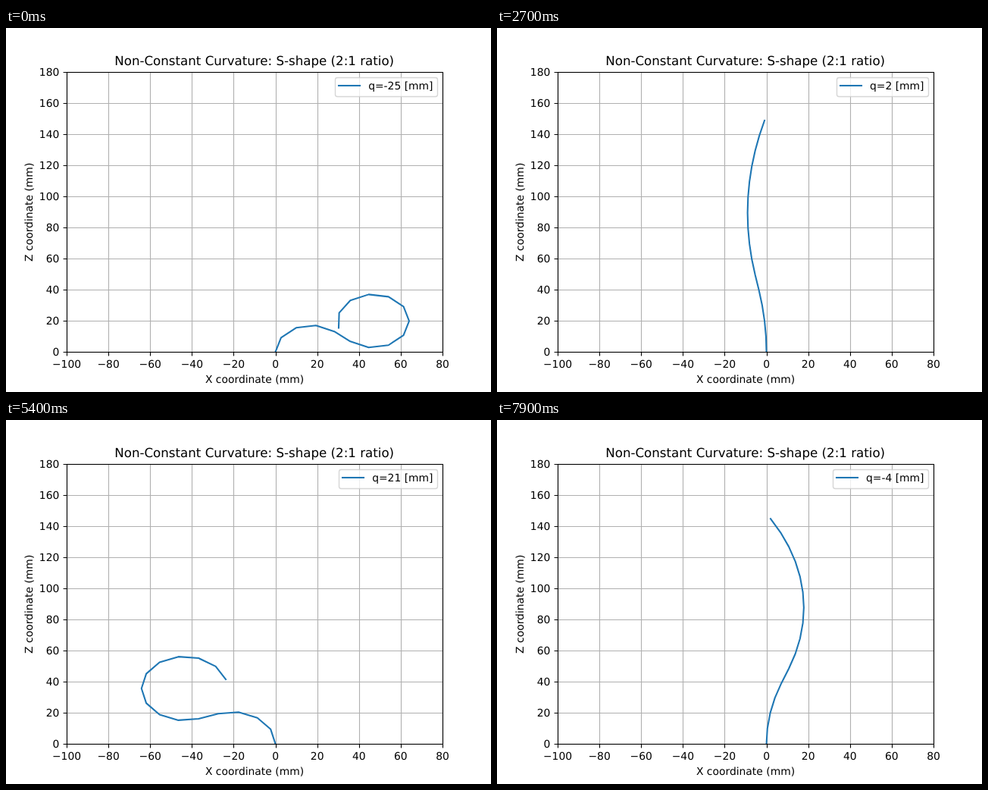
Animation of 640x480 px, one loop 8000 ms. Source, as an HTML page:

```html
<!DOCTYPE html>
<html lang="en">
<head>
<meta charset="utf-8">
<title>S-shape curvature</title>
<style>
  html, body { margin: 0; width: 100%; height: 100%; overflow: hidden; background: #fff; }
  svg { display: block; width: 640px; height: 480px; }
  text { font: 13.889px "DejaVu Sans", sans-serif; text-rendering: geometricPrecision; fill: #000; }
  .title { font-size: 16.667px; }
  .mid { text-anchor: middle; }
  .end { text-anchor: end; }
  path, rect { fill: none; }
  #grid { stroke: #b0b0b0; stroke-width: 1.111; }
  #ticks, #frame { stroke: #000; stroke-width: 1.111; }
  .curve { stroke: #1f77b4; stroke-width: 2.083; stroke-linecap: square; stroke-linejoin: round; }
  #box { fill: #fff; fill-opacity: .8; stroke: #ccc; stroke-opacity: .8; stroke-width: 1.389; }
</style>
</head>
<body>
<svg viewBox="0 0 640 480">
  <clipPath id="area"><rect x="80" y="57.6" width="496" height="369.6"/></clipPath>
  <path id="grid"/>
  <path id="ticks"/>
  <g id="labels"></g>
  <g clip-path="url(#area)"><path id="arm" class="curve"/></g>
  <rect id="frame" x="80.5" y="58.5" width="496" height="369"/>
  <text class="title mid" x="327.7" y="49">Non-Constant Curvature: S-shape (2:1 ratio)</text>
  <text class="mid" x="328" y="468">X coordinate (mm)</text>
  <text class="mid" transform="translate(35 242.8) rotate(-90)">Z coordinate (mm)</text>
  <rect id="box" y="65.5" height="25" rx="2.78"/>
  <path id="key" class="curve"/>
  <text id="value" class="end" x="563.5" y="81"></text>
</svg>
<script>
  const $ = id => document.getElementById(id);
  const STEP = 100, LOOP = 8000;
  const px = x => 80 + (x + 100) * 496 / 180;
  const py = z => 427.2 - z * 369.6 / 180;
  const snap = v => Math.floor(v + 0.5) + 0.5;

  function addLabel(value, cls, x, y) {
    const t = document.createElementNS("http://www.w3.org/2000/svg", "text");
    t.setAttribute("class", cls);
    t.setAttribute("x", x);
    t.setAttribute("y", y);
    t.textContent = String(value).replace("-", "\u2212");
    $("labels").append(t);
  }

  function drawAxes() {
    let grid = "", ticks = "";
    for (let v = 0; v <= 180; v += 20) {
      const x = snap(px(v - 100)), y = snap(py(v));
      grid += `M${x} 427.5V58.5M80.5 ${y}H576.5`;
      ticks += `M${x} 427.5v4.9M80.5 ${y}h-4.9`;
      addLabel(v - 100, "mid", px(v - 100), 448);
      addLabel(v, "end", 70.3, Math.round(py(v) + 5.1));
    }
    $("grid").setAttribute("d", grid);
    $("ticks").setAttribute("d", ticks);
  }

  // Trapezoidal integration: curvature flips sign after the first third.
  function armPath(q) {
    const ds = 10, n = 15, flip = 5;
    const kappa = i => (i < flip ? -q : q) / 441;
    let x = 0, z = 0, a = 0;
    let d = `M${px(0)} ${py(0)}`;
    for (let i = 1; i <= n; i++) {
      const b = a + ds * (kappa(i - 1) + kappa(i)) / 2;
      x += ds * (Math.sin(a) + Math.sin(b)) / 2;
      z += ds * (Math.cos(a) + Math.cos(b)) / 2;
      a = b;
      d += `L${px(x).toFixed(2)} ${py(z).toFixed(2)}`;
    }
    return d;
  }

  function drawLegend(q) {
    $("value").textContent = `q=${q} [mm]`;
    const left = 563.5 - $("value").getComputedTextLength();
    const boxLeft = snap(left - 44.44);
    const keyLeft = Math.round(left - 38.9);
    $("box").setAttribute("x", boxLeft);
    $("box").setAttribute("width", 569.5 - boxLeft);
    $("key").setAttribute("d", `M${keyLeft} 76h28`);
  }

  let shown = null;
  function tick() {
    const i = Math.floor(performance.now() % LOOP / STEP);
    const q = 25 - Math.abs(i - 50);
    if (q !== shown) {
      shown = q;
      $("arm").setAttribute("d", q ? armPath(q) : `M356 ${py(0)}V${py(150)}`);
      drawLegend(q);
    }
    requestAnimationFrame(tick);
  }

  drawAxes();
  tick();
</script>
</body>
</html>
```
